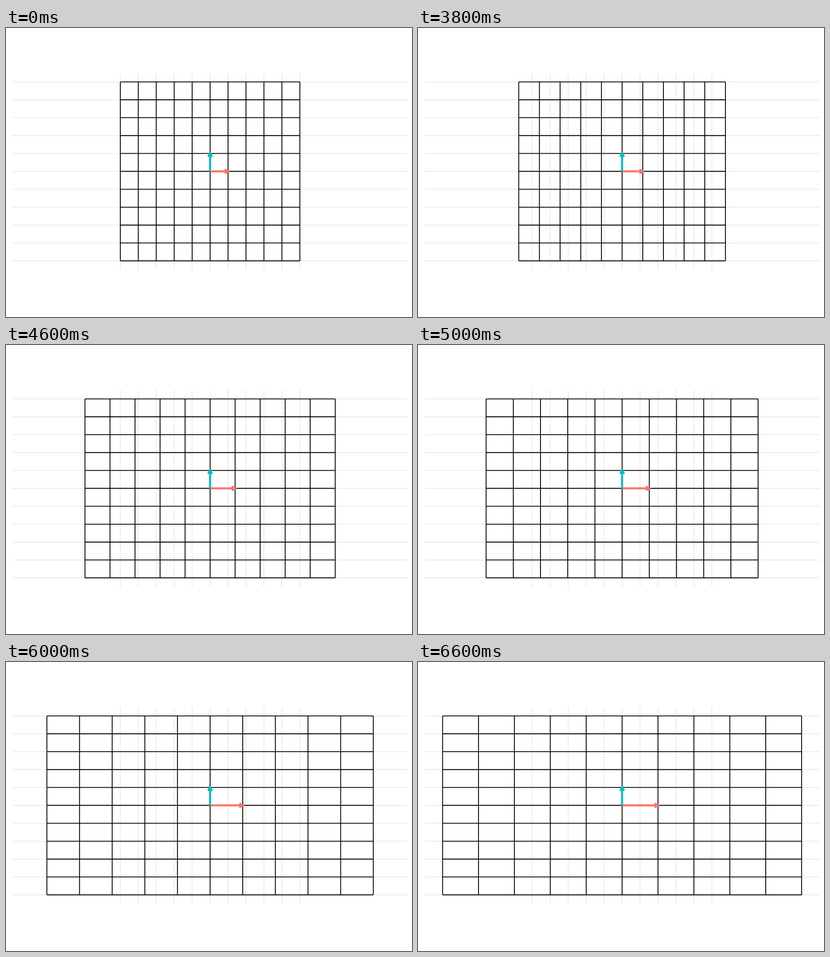
An HTML page with a canvas that plays this animation: 885 px wide and 632 px high, repeating every 10000 ms.

```html
<!DOCTYPE html>
<html lang="en">
<head>
<meta charset="utf-8">
<title>Stretching grid</title>
<style>
html, body { margin: 0; width: 100%; height: 100%; overflow: hidden; background: #fff; }
canvas { display: block; }
</style>
</head>
<body>
<canvas width="885" height="632"></canvas>
<script>
const ctx = document.querySelector('canvas').getContext('2d');
const CX = 444.9, CY = 313.55, UNIT = 39.13;
const LOOP = 10000, STEP = 100, START = 3300, STEPS = 33;

// Grid coordinates: origin in the centre, y pointing up.
const px = x => CX + x * UNIT;
const py = y => CY - y * UNIT;

function grid(color, scale, halfW, halfH) {
  ctx.strokeStyle = color;
  ctx.lineWidth = 1.87;
  ctx.beginPath();
  for (let i = -5; i <= 5; i++) {
    ctx.moveTo(px(i * scale), py(-halfH));
    ctx.lineTo(px(i * scale), py(halfH));
    ctx.moveTo(px(-halfW), py(i));
    ctx.lineTo(px(halfW), py(i));
  }
  ctx.stroke();
}

function arrow(color, length, angle) {
  const tip = length * UNIT, back = tip - 5.6, half = 3.4;
  ctx.save();
  ctx.translate(CX, CY);
  ctx.rotate(angle);
  ctx.strokeStyle = ctx.fillStyle = color;
  ctx.lineWidth = 4.48;
  ctx.lineJoin = 'round';
  ctx.beginPath();
  ctx.moveTo(0, 0);
  ctx.lineTo(tip, 0);
  ctx.stroke();
  ctx.beginPath();
  ctx.moveTo(back, -half);
  ctx.lineTo(tip, 0);
  ctx.lineTo(back, half);
  ctx.closePath();
  ctx.fill();
  ctx.stroke();
  ctx.restore();
}

function draw(now) {
  const step = Math.floor((now % LOOP - START) / STEP);
  const scale = 1 + Math.min(Math.max(step, 0), STEPS) / STEPS;
  ctx.fillStyle = '#fff';
  ctx.fillRect(0, 0, 885, 632);
  grid('#ebebeb', 1, 11, 5.5);
  grid('#000', scale, 5 * scale, 5);
  arrow('#f8766d', scale, 0);
  arrow('#00bfc4', 1, -Math.PI / 2);
}

const begin = performance.now();
function frame() {
  draw(performance.now() - begin);
  requestAnimationFrame(frame);
}
frame();
</script>
</body>
</html>
```
